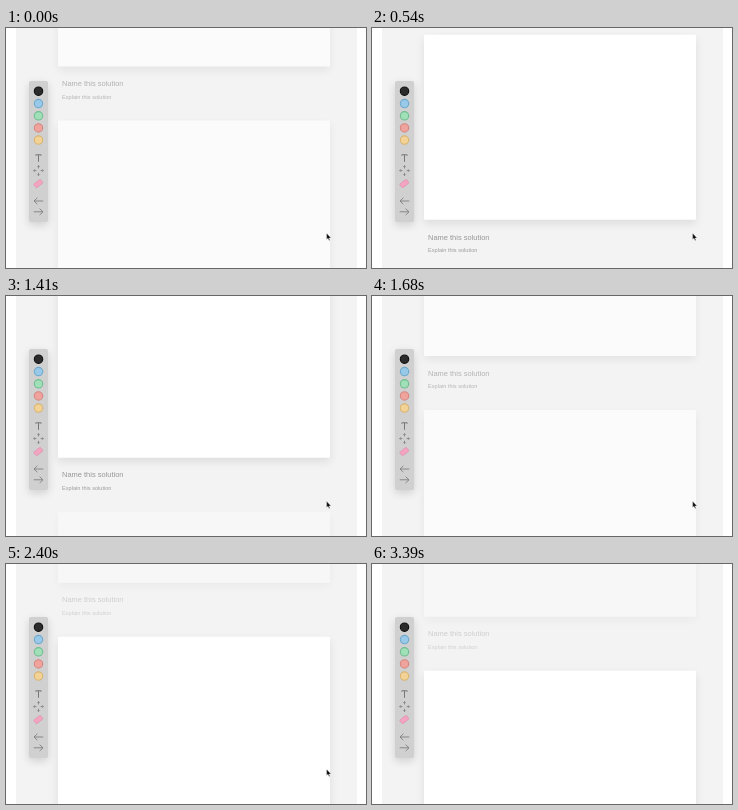
These frames come from a looping animation (360x240 px, 3.42 s). An HTML page:

```html
<!DOCTYPE html>
<html lang="en">
<head>
<meta charset="utf-8">
<title>Solution boards</title>
<style>
  html, body { margin: 0; width: 100%; height: 100%; overflow: hidden; background: #fff; }
  #stage { position: relative; width: 360px; height: 240px; overflow: hidden; }
  #page { position: absolute; left: 10px; width: 341px; height: 240px; background: #f3f3f3; overflow: hidden; }
  .item { position: absolute; left: 42px; top: 0; width: 272px; font-family: "Liberation Sans", Arial, sans-serif; white-space: nowrap; }
  .board { height: 185px; background: #fff; border-radius: 1px; box-shadow: 0 4px 10px rgba(0, 0, 0, .09); }
  .item svg { position: absolute; left: 0; top: 185px; }
  #tools { position: absolute; left: 23px; top: 52.5px; width: 19px; height: 141.5px; border-radius: 2px;
    background: #d0d0d0; box-shadow: 0 3px 8px rgba(0, 0, 0, .15); }
  #icons { position: absolute; left: 0; top: 0; }
</style>
</head>
<body>
<div id="stage">
  <div id="page"></div>
  <div id="tools"></div>
  <svg id="icons" width="360" height="240" fill="none">
    <g stroke-width="1.1">
      <circle cx="32.5" cy="63.2" r="4.2" fill="#2b2b2b" stroke="#111"/>
      <circle cx="32.5" cy="75.6" r="4.2" fill="#98c9e8" stroke="#6fa9cd"/>
      <circle cx="32.5" cy="87.8" r="4.2" fill="#a0e0b8" stroke="#72bd90"/>
      <circle cx="32.5" cy="99.9" r="4.2" fill="#efa39c" stroke="#d58780"/>
      <circle cx="32.5" cy="112.1" r="4.2" fill="#f3d295" stroke="#d9b573"/>
    </g>
    <g stroke="#808080" stroke-width=".9">
      <path d="M29.8 127.6v-.8h5.4v.8M32.5 126.8v7" stroke="#6c6c6c"/>
      <path d="M32.5 137.6v2.8M32.5 144.8v2.8M27.6 142.6h2.8M34.6 142.6h2.8"/>
      <path d="M31 139l1.5-1.5 1.5 1.5M31 146.2l1.5 1.5 1.5-1.5M29 141.1l-1.5 1.5 1.5 1.5M36 141.1l1.5 1.5-1.5 1.5" stroke-width=".6"/>
      <path d="M37.3 173h-9.3M31.4 169.8l-3.4 3.2 3.4 3.2M27.7 183.8h9.3M33.6 180.6l3.4 3.2-3.4 3.2"/>
    </g>
    <rect x="28" y="153.2" width="8.6" height="4.8" rx="1.3" fill="#f2a4c0" stroke="#dc8fac" stroke-width=".6" transform="rotate(-38 32.3 155.6)"/>
    <path id="cursor" d="M320.6 205.2v6.4l1.4-1.3 1 2.3 1-.4-1-2.2h2z" fill="#111" stroke="#fff" stroke-width=".3"/>
  </svg>
</div>
<script>
  const LOOP = 3420, PITCH = 239, START = 93, FADE = 160, DIM = 0.4;
  const knots = [[0, 0], [150, 50], [540, 86], [690, 186], [840, 225],
    [1410, 355], [2040, 611], [2400, 737], [3390, 942], [3420, 949]];

  // Monotone cubic slopes
  const rate = knots.slice(1).map(([t, s], i) => (s - knots[i][1]) / (t - knots[i][0]));
  const slope = knots.map((_, i) => {
    const a = rate[i - 1], b = rate[i];
    return a === undefined ? 0.5 : b === undefined ? a : 2 * a * b / (a + b);
  });

  function scrollAt(t) {
    if (t < 0) return t * 0.75;
    let i = 0;
    while (i < knots.length - 2 && t > knots[i + 1][0]) i++;
    const [t0, s0] = knots[i], [t1, s1] = knots[i + 1];
    const h = t1 - t0, u = (t - t0) / h, v = 1 - u;
    return s0 * (1 + 2 * u) * v * v + h * slope[i] * u * v * v
      + s1 * u * u * (3 - 2 * u) - h * slope[i + 1] * u * u * v;
  }

  // The board nearest the middle is in focus
  const focusAt = t => Math.round((scrollAt(t) - START + 28) / PITCH);

  function opacityOf(index, t) {
    const n = 32;
    let hits = 0;
    for (let k = 0; k < n; k++) if (focusAt(t - (k + 0.5) * FADE / n) === index) hits++;
    return DIM + (1 - DIM) * hits / n;
  }

  const page = document.getElementById('page');
  const cursor = document.getElementById('cursor');
  const items = [0, 1].map(() => {
    const el = document.createElement('div');
    el.className = 'item';
    el.innerHTML = `<div class="board"></div>
      <svg width="272" height="40">
        <text x="4" y="19.7" font-size="7.48" fill="#979797">Name this solution</text>
        <text x="4" y="32" font-size="5.6" fill="#9c9c9c">Explain this solution</text>
      </svg>`;
    return page.appendChild(el);
  });

  function draw(now) {
    const t = now % LOOP, s = scrollAt(t);
    const last = Math.ceil((s - START) / PITCH);
    items.forEach((el, i) => {
      const index = last - 1 + i;
      el.style.transform = `translateY(${(START + PITCH * index - s).toFixed(2)}px)`;
      el.style.opacity = opacityOf(index, t);
    });
    cursor.style.visibility = t < 3330 ? 'visible' : 'hidden';
  }

  const begin = performance.now();
  function tick() {
    draw(performance.now() - begin);
    requestAnimationFrame(tick);
  }
  tick();
</script>
</body>
</html>
```
